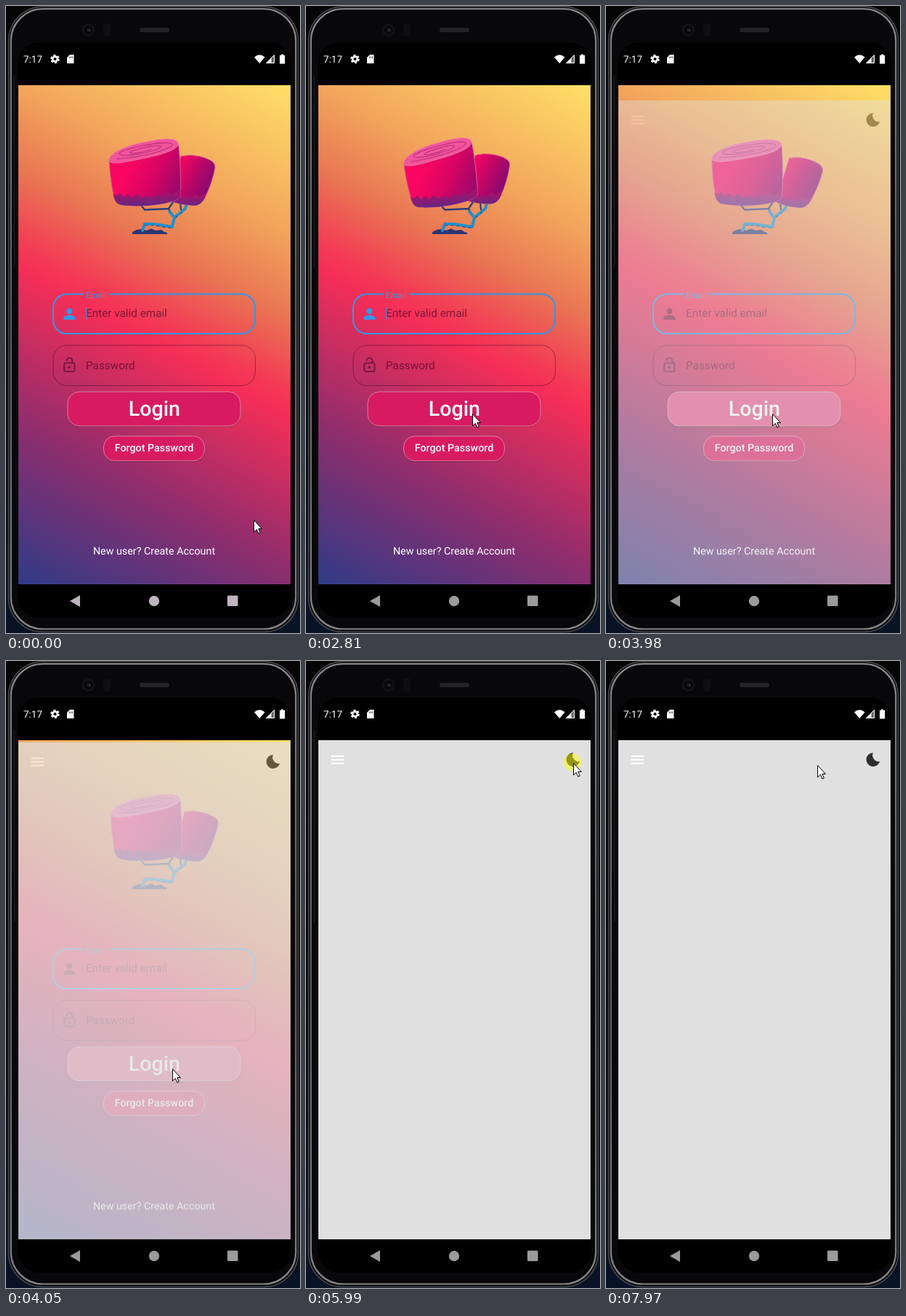
Recreate the animation shown at these times as an HTML page. Size 405 by 863 pixels, loop 7990 ms.

```html
<!DOCTYPE html>
<html lang="en">
<head>
<meta charset="utf-8">
<title>Login screen</title>
<style>
html, body { margin: 0; width: 100%; height: 100%; overflow: hidden; background: #000; }
svg { display: block; width: 100%; height: 100%; }
text { font-family: Roboto, sans-serif; text-rendering: geometricPrecision; }
.mid { text-anchor: middle; fill: #fff; }
.hint { font-size: 15.3px; fill: #1c0020; fill-opacity: .54; }
</style>
</head>
<body>
<svg viewBox="0 0 405 863" preserveAspectRatio="none">
  <defs>
    <linearGradient id="sky" gradientUnits="userSpaceOnUse" x1="392" y1="109" x2="17" y2="796">
      <stop offset="0" stop-color="#ffe068"/>
      <stop offset=".23" stop-color="#f2a55c"/>
      <stop offset=".36" stop-color="#e97653"/>
      <stop offset=".47" stop-color="#f33c55"/>
      <stop offset=".51" stop-color="#f52e57"/>
      <stop offset=".75" stop-color="#8f2d6d"/>
      <stop offset="1" stop-color="#303b88"/>
    </linearGradient>
    <linearGradient id="crown" x1="0" y1=".3" x2="1" y2=".75">
      <stop offset=".25" stop-color="#fa0662"/>
      <stop offset=".6" stop-color="#d80463"/>
      <stop offset="1" stop-color="#94096c"/>
    </linearGradient>
    <linearGradient id="side" x1="0" y1="0" x2="1" y2=".6">
      <stop offset=".25" stop-color="#f20562"/>
      <stop offset=".6" stop-color="#b80667"/>
      <stop offset="1" stop-color="#7b0d70"/>
    </linearGradient>
    <linearGradient id="dusk" x1="0" y1="0" x2="0" y2="1">
      <stop offset="0" stop-color="#b40c69"/>
      <stop offset=".5" stop-color="#8f1a74"/>
      <stop offset="1" stop-color="#652882"/>
    </linearGradient>
    <linearGradient id="rim" x1="0" y1="0" x2="0" y2="1">
      <stop offset="0" stop-color="#8b8b8d"/>
      <stop offset=".1" stop-color="#7d7d7f"/>
      <stop offset=".5" stop-color="#5c5c5e"/>
      <stop offset="1" stop-color="#858587"/>
    </linearGradient>
    <linearGradient id="desk" x1="0" y1="0" x2="0" y2="1">
      <stop offset=".4" stop-color="#050506"/>
      <stop offset="1" stop-color="#081426"/>
    </linearGradient>
    <filter id="soft" x="-20%" y="-50%" width="140%" height="200%"><feGaussianBlur stdDeviation="3"/></filter>
    <clipPath id="view"><rect x="17" y="109" width="375" height="687"/></clipPath>
    <clipPath id="btn"><rect x="85" y="531" width="238" height="47" rx="16"/></clipPath>
  </defs>

  <!-- phone -->
  <rect width="405" height="863" fill="url(#desk)"/>
  <rect x="3.500" y="1" width="399" height="860.500" rx="47" fill="#0c0c0e" stroke="#4c4c4e" stroke-width="1.500"/>
  <rect x="6.800" y="4" width="392.400" height="853.500" rx="44" fill="#08080a" stroke="url(#rim)" stroke-width="2.200"/>
  <path d="M11.500 95V360" stroke="#1c1c1f" stroke-width="1.500"/>
  <rect x="16" y="50" width="377" height="792" rx="30"/>
  <circle cx="113.500" cy="33" r="9" fill="#121214"/>
  <circle cx="113.500" cy="33" r="6" fill="#08080a"/>
  <circle cx="114" cy="33" r="2.500" fill="#1c1e20"/>
  <circle cx="115.500" cy="33.500" r="1" fill="#4a4e52"/>
  <rect x="134" y="24" width="10" height="18" rx="2" fill="#0e0e10"/>
  <rect x="184" y="30" width="41" height="6" rx="2.500" fill="#232326"/>

  <!-- status bar -->
  <g fill="#fff">
    <text x="24" y="78.300" font-size="13.5">7:17</text>
    <circle cx="67.500" cy="73" r="3.400" fill="none" stroke="#fff" stroke-width="2.700"/>
    <circle cx="67.500" cy="73" r="5.200" fill="none" stroke="#fff" stroke-width="2.200" stroke-dasharray="2.9 2.545"/>
    <path d="M88 67H93.500V79H84V71Z"/>
    <path d="M87.500 69.500v2.500M89.500 69.500v2.500M91.500 69.500v2.500" stroke="#000" stroke-width=".7"/>
    <path d="M342 70.500Q349.300 64 356.600 70.500L349.300 79Z"/>
    <path d="M370 67V79H358Z" fill-opacity=".4"/>
    <path d="M365.500 71.500V79H358Z"/>
    <path d="M369.500 67.500V78.500H358.500Z" fill="none" stroke="#fff"/>
    <path d="M379 66.500h3v1.300h2.200V79.500H377V67.800h2z"/>
  </g>

  <!-- navigation bar -->
  <g id="nav">
    <path d="M88 819L102 811V827Z"/>
    <circle cx="204" cy="819" r="7.200"/>
    <rect x="305" y="811.500" width="14.500" height="14.500" rx="1"/>
  </g>

  <g clip-path="url(#view)">
    <g id="login">
      <rect x="17" y="109" width="375" height="687" fill="url(#sky)"/>

      <!-- tree -->
      <path d="M174 314V311L180 308 187 307 193 309 200 306.500 206 309 214 308 218 311 222 312V314Z" fill="#2c3674"/>
      <g fill="none" stroke-linejoin="round" stroke-linecap="round">
        <path d="M186 274L191 280.500 224 279 230 270M224 279L229 288M240 270L241 280" stroke="#2b3f7c" stroke-width="2.300"/>
        <path d="M188 309L191 300 203 300 229 304 232 291 247 279 249 272M232 291L225 283" stroke="#218fca" stroke-width="4"/>
        <path d="M192 302L203 302 227 305.500M234 291L246 281" stroke="#274f8f" stroke-width="1.200" stroke-dasharray="3 5"/>
      </g>
      <g id="small">
        <path d="M241 207Q252 204 264 206.500C273 208 283 212 286 216Q289 219 287.500 225C285 238 280 252 274 264Q269 274 260 274.500Q240 274 226 268Z" fill="url(#side)" stroke="#d85a94" stroke-width=".9"/>
        <path d="M228 260L244 264 249 261 255 264 261 259 267 262 276 257.500 274 264Q269 274 260 274.500Q240 274 226 268Z" fill="url(#dusk)"/>
      </g>
      <g id="big">
        <path d="M142 212C143 232 146 252 149 264Q151 273 160 274C185 277 215 274 232 268Q241 265 240.500 258C241 235 240 210 237.500 190Z" fill="url(#crown)" stroke="#d9649a" stroke-width=".9"/>
        <path d="M147.500 259L153 261 157 257 162 263 168 259 174 264 180 258 187 264 194 260 200 264 208 259 215 262 222 256 229 260 240.500 252V258Q241 265 232 268C215 274 185 277 160 274Q151 273 149 264Z" fill="url(#dusk)"/>
        <path d="M142 213C141 203 165 192 190 187.500C215 182 233 181 237 188C239 196 222 203 195 208.500C165 215 145 219 142 213Z" fill="#f2559a" stroke="#e77fae" stroke-width=".8"/>
        <path d="M152 210.500C190 208 232 196 229 190C222 184 160 196 156 203C158 210 212 200 214 193C208 190 172 198 171 202C176 204 194 200 200 197" fill="none" stroke="#c43583" stroke-width="1.300"/>
      </g>

      <!-- form -->
      <path d="M143 396.500H324A19 19 0 0 1 343 415.500V432A19 19 0 0 1 324 451H84A19 19 0 0 1 65 432V415.500A19 19 0 0 1 84 396.500H107" fill="none" stroke="#2f98ea" stroke-width="2"/>
      <text x="110" y="401.800" font-size="11.5" fill="#2f98ea">Email</text>
      <g id="person">
        <circle cx="87.300" cy="420" r="4"/>
        <path d="M79.300 431.700V429.500C79.300 426.800 84.500 425.500 87.300 425.500S95.300 426.800 95.300 429.500V431.700Z"/>
      </g>
      <text class="hint" x="110" y="428.300">Enter valid email</text>
      <rect id="caret" x="110.300" y="415" width="1.500" height="16" fill="#2f98ea" fill-opacity=".75"/>
      <rect x="65" y="467" width="278.500" height="55.500" rx="19" fill="none" stroke="#1c0020" stroke-opacity=".4"/>
      <g fill="none" stroke="#1c0020" stroke-opacity=".5" stroke-width="1.800">
        <rect x="80.200" y="491.300" width="14.300" height="11.800" rx="1.500"/>
        <path d="M83.500 488.500V488.200A3.900 3.900 0 0 1 91.300 488.200V491"/>
        <circle cx="87.300" cy="497.200" r=".9"/>
      </g>
      <text class="hint" x="110" y="499.800">Password</text>
      <rect id="lift" x="85" y="535" width="238" height="46" rx="16" fill="#000" filter="url(#soft)"/>
      <rect x="85.500" y="532" width="238" height="47.500" rx="16" fill="#000" fill-opacity=".15"/>
      <rect x="85" y="531" width="238" height="47" rx="16" fill="#d81b60"/>
      <circle id="splash" cx="229" cy="561" fill="#fff" fill-opacity=".24" clip-path="url(#btn)"/>
      <rect x="85" y="531" width="238" height="47" rx="16" fill="none" stroke="#fff" stroke-opacity=".4"/>
      <text class="mid" x="204.300" y="564" font-size="28.6" font-weight="500">Login</text>
      <rect x="135" y="593" width="139" height="35" rx="15" fill="#000" fill-opacity=".15"/>
      <rect x="134.500" y="592" width="139" height="34" rx="15" fill="#d81b60" stroke="#fff" stroke-opacity=".4"/>
      <text class="mid" x="204" y="613.300" font-size="14.3" font-weight="500">Forgot Password</text>
      <text class="mid" x="204" y="755" font-size="14.3">New user? Create Account</text>
    </g>

    <g id="home">
      <rect id="paper" x="17" y="109" width="375" height="687"/>
      <path d="M34.500 131H52.200M34.500 136H52.200M34.500 141H52.200" stroke="#fff" stroke-width="1.900"/>
      <path id="moon" d="M368 126.300A9.500 9.500 0 1 0 377.200 138.300A8.600 8.600 0 0 1 368 126.300Z"/>
    </g>
  </g>

  <g id="mouse">
    <circle id="press" cx="-1" cy="-.5" r="12" fill="#ff0" fill-opacity=".5"/>
    <path d="M.5 .7V17L4.300 13.400 6.800 19.200 9.300 18.100 6.800 12.500H11.500Z" fill="#fff" stroke="#000" stroke-width="1"/>
  </g>
</svg>
<script>
const LOOP = 7990, SWAY = 820;
const $ = id => document.getElementById(id);
const part = {};
for (const id of ['nav', 'login', 'small', 'big', 'person', 'caret', 'lift', 'splash', 'home', 'paper', 'moon', 'mouse', 'press']) part[id] = $(id);

const set = (id, attrs) => { for (const k in attrs) part[id].setAttribute(k, attrs[k]); };
const show = (id, on) => { part[id].style.display = on ? '' : 'none'; };
const mix = (a, b, k) => a + (b - a) * k;
const span = (t, a, b) => Math.min(1, Math.max(0, (t - a) / (b - a)));
const grey = v => `rgb(${v},${v},${v})`;
const smooth = k => k * k * (3 - 2 * k);
const easeOut = k => 1 - (1 - k) ** 3;

function bezier(x1, y1, x2, y2) {
  const at = (a, b, s) => 3 * (1 - s) * (1 - s) * s * a + 3 * (1 - s) * s * s * b + s ** 3;
  return x => {
    let lo = 0, hi = 1;
    for (let i = 0; i < 20; i++) {
      const m = (lo + hi) / 2;
      if (at(x1, x2, m) < x) lo = m; else hi = m;
    }
    return at(y1, y2, lo);
  };
}
const slideEase = bezier(.4, 0, .2, 1), fadeEase = bezier(.42, 0, 1, 1);

// Looping sway: [phase, degrees] for the big crown, [phase, reach] for the small one
const bigKeys = [[0, 0], [.2, -2.8], [.427, -4.3], [.646, -2], [.854, 2.1], [1, 0]];
const smallKeys = [[0, 0], [.2, -5], [.427, -7], [.646, 9], [.854, 10], [1, 0]];

function cyclic(keys, p) {
  const n = keys.length - 1;
  let i = 0;
  while (i < n - 1 && p >= keys[i + 1][0]) i++;
  const key = j => {
    const w = Math.floor(j / n), [x, y] = keys[j - w * n];
    return [x + w, y];
  };
  const [a, b, c, d] = [-1, 0, 1, 2].map(o => key(i + o));
  const h = c[0] - b[0], u = (p - b[0]) / h;
  const m0 = (c[1] - a[1]) / (c[0] - a[0]) * h, m1 = (d[1] - b[1]) / (d[0] - b[0]) * h;
  return mix(b[1], c[1], smooth(u)) + m0 * u * (1 - u) ** 2 - m1 * u * u * (1 - u);
}

// Pointer moves: start, end, from, to, easing
const moves = [
  [2250, 2560, [341, 707], [229, 561], smooth],
  [4630, 5130, [229, 561], [368, 140], easeOut],
  [7890, 7970, [368, 140], [291, 143], k => k]
];
const clicks = [[3560, 3700], [5890, 6030], [7160, 7260]];

function pointer(t) {
  const [a, b, from, to, ease] = moves.filter(m => t >= m[0]).pop() || moves[0];
  const k = ease(span(t, a, b));
  return from.map((v, i) => mix(v, to[i], k));
}

function draw(t) {
  const fade = span(t, 20, 700);
  set('nav', { fill: `rgb(${mix(190, 155, fade)},${mix(181, 155, fade)},${mix(190, 155, fade)})` });

  // Login page
  const pageT = t > 3740 && t < 3890 ? 3740 : t;
  show('login', t < 4070);
  const phase = pageT % SWAY / SWAY;
  const reach = cyclic(smallKeys, phase);
  set('big', { transform: `rotate(${cyclic(bigKeys, phase)} 200 312)` });
  set('small', { transform: `translate(${reach * .7} ${reach * .2}) rotate(${reach * .35} 240 280)` });
  const focused = t < 3890;
  show('caret', focused && (pageT + 450) % 1000 < 500);
  set('person', focused ? { fill: '#2f98ea', 'fill-opacity': 1 } : { fill: '#1c0020', 'fill-opacity': .5 });
  set('splash', { r: 240 * span(pageT, 3580, 3740) });
  set('lift', { 'fill-opacity': .14 * span(pageT, 3580, 3700) });

  // Home page
  const enter = t >= 4070 ? 1 : span(t, 3800, 4100);
  const dark = span(t, 6000, 6200) - span(t, 7190, 7360);
  show('home', t >= 3890);
  set('home', {
    opacity: enter < 1 ? fadeEase(enter) : 1,
    transform: `translate(0 ${enter < 1 ? 172 * (1 - slideEase(enter)) : 0})`
  });
  set('paper', { fill: grey(mix(224, 46, dark)) });
  set('moon', { fill: grey(mix(47, 255, dark)) });

  set('mouse', { transform: `translate(${pointer(t)})` });
  show('press', clicks.some(([a, b]) => t >= a && t < b));
}

const start = performance.now();
function tick() {
  draw((performance.now() - start) % LOOP);
  requestAnimationFrame(tick);
}
draw(0);
requestAnimationFrame(tick);
</script>
</body>
</html>
```
